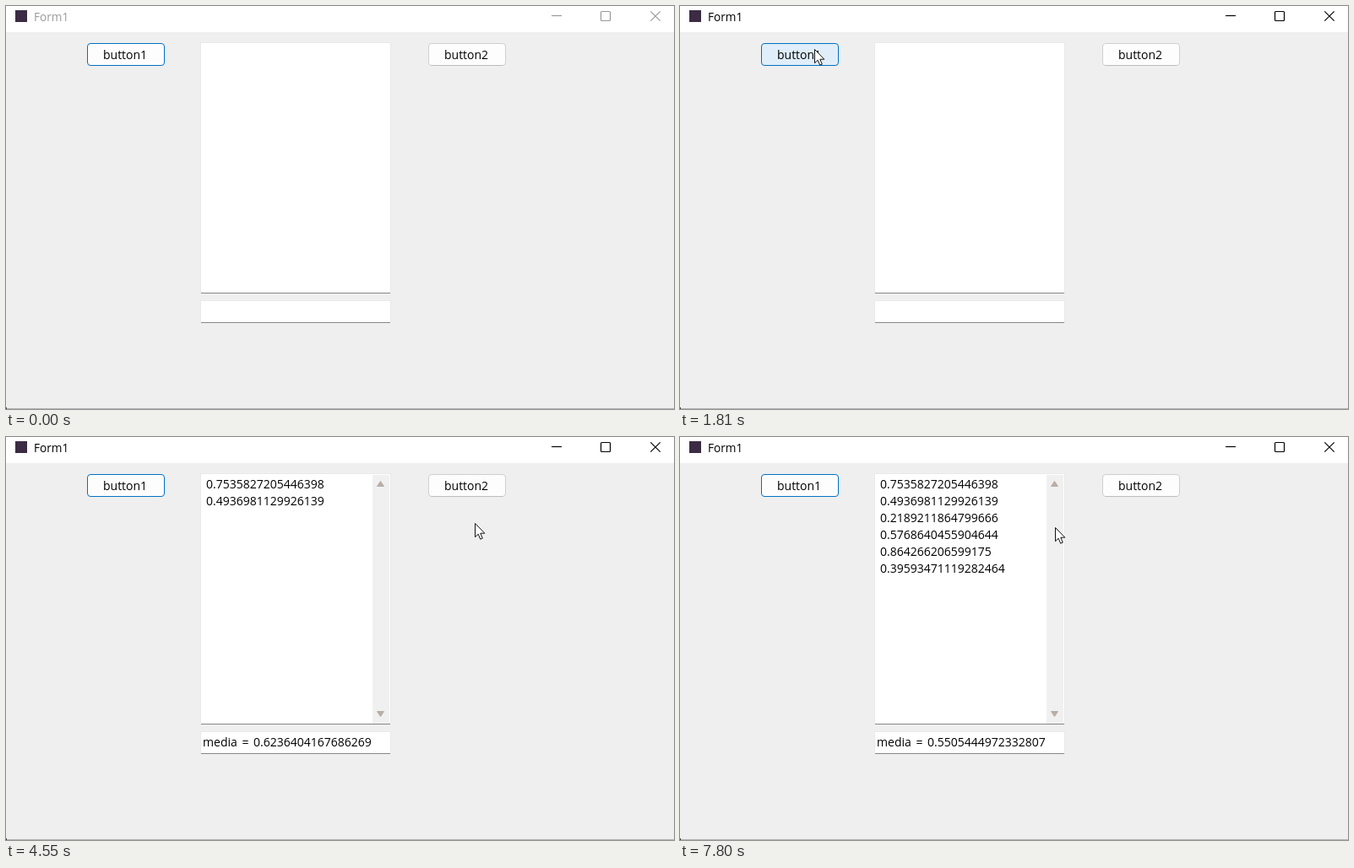
An HTML page for the animation above (8000 ms loop, 791 px wide and 478 px high).

```html
<!DOCTYPE html>
<html lang="en">
<head>
<meta charset="utf-8">
<title>Form1</title>
<style>
  html, body { margin: 0; width: 100%; height: 100%; overflow: hidden; background: #efefef; }
  svg { display: block; }
  text { font: 14px "Open Sans", "Noto Sans", sans-serif; fill: #000; white-space: pre; }
  #title { font-size: 13.6px; }
  #mean { word-spacing: 2px; }
</style>
</head>
<body>
<svg width="791" height="478" viewBox="0 0 791 478">
  <rect width="791" height="478" fill="#efefef"/>
  <rect width="791" height="31" fill="#fff"/>
  <path d="M0 477.5H791" stroke="#b4b4b4"/>
  <rect y="476" width="1" height="2" fill="#444"/>
  <rect x="11" y="5" width="14" height="14" fill="#3b2b43"/>
  <text id="title" x="33" y="17.5">Form1</text>
  <g id="controls" fill="none" stroke-width="1.2">
    <path d="M646 11.5H658"/>
    <rect x="704.5" y="6.5" width="11" height="11" rx="1"/>
    <path d="M763.3 6.3L774.7 17.7M774.7 6.3L763.3 17.7"/>
  </g>

  <rect id="button1" x="96.5" y="44.5" width="91" height="26" rx="3.5" stroke="#0070c4"/>
  <text x="115" y="63">button1</text>
  <rect x="500.5" y="44.5" width="91" height="26" rx="3.5" fill="#fdfdfd" stroke="#cfcfcf"/>
  <path d="M503.5 70.5H588.5" stroke="#bcbcbc"/>
  <text x="519" y="63">button2</text>

  <g fill="#fff" stroke="#e9e9e9">
    <rect x="230.5" y="43.5" width="225" height="297"/>
    <rect x="230.5" y="349.5" width="225" height="26"/>
  </g>
  <path d="M231 340.5H455M231 375.5H455" stroke="#868686"/>

  <g id="results">
    <rect x="434" y="45" width="20" height="295" fill="#f0f0f0"/>
    <path d="M443.5 52.5L447.5 58.5H439.5ZM443.5 331.5L447.5 325.5H439.5Z"
      fill="#b9aea5" stroke="#b9aea5" stroke-linejoin="round"/>
    <g id="list"></g>
    <text id="mean" x="233" y="367"></text>
  </g>

  <path id="cursor" d="M.5 .5V16.7L4.2 13.2L6.7 19.2L9.3 18.1L6.8 12.2H11.8Z" fill="#fff" stroke="#111"/>
</svg>
<script>
const LOOP = 8000;
const TICK = 70;             // pointer refresh, ms
const PRESS = 1680, RELEASE = 1810;
const FIRST = 2808, PERIOD = 998;
const values = [
  0.7535827205446398, 0.4936981129926139, 0.2189211864799666,
  0.5768640455904644, 0.864266206599175, 0.39593471119282464
];

const linear = u => u;
const easeOut = u => 1 - (1 - u) ** 2;

// The pointer rests at the end of each move until the next one begins.
const moves = [
  { start: 520, end: 1290, from: [234, 462], to: [161, 49], ease: easeOut },
  { start: 1360, end: 1480, from: [160, 50], to: [159, 51], ease: linear },
  { start: 3070, end: 3280, from: [172, 53], to: [530, 84], ease: linear },
  { start: 3340, end: 3410, from: [588, 86], to: [602, 86], ease: linear },
  { start: 4220, end: 4300, from: [601, 84], to: [600, 83], ease: linear },
  { start: 4550, end: 5240, from: [555, 102], to: [444, 107], ease: easeOut }
];

function pointerAt(t) {
  const move = moves.filter(m => m.start <= t).pop();
  if (!move) return null;
  const { start, end, from, to, ease } = move;
  const elapsed = t >= end ? end - start : Math.floor((t - start) / TICK) * TICK;
  const k = ease(elapsed / (end - start));
  return from.map((v, axis) => Math.round(v + (to[axis] - v) * k));
}

const $ = id => document.getElementById(id);
const show = (el, on) => el.style.display = on ? "" : "none";

const lines = values.map((value, i) => {
  const line = document.createElementNS("http://www.w3.org/2000/svg", "text");
  line.setAttribute("x", 237);
  line.setAttribute("y", 61 + 20 * i);
  line.textContent = value;
  return $("list").appendChild(line);
});

function drawPointer(t) {
  const spot = pointerAt(t);
  show($("cursor"), spot);
  if (spot) $("cursor").setAttribute("transform", `translate(${spot})`);
  const hover = spot && spot[0] >= 96 && spot[0] < 188 && spot[1] >= 44 && spot[1] < 71;
  const pressed = t >= PRESS && t < RELEASE;
  $("button1").setAttribute("fill", pressed ? "#cce4f7" : hover ? "#e0eef9" : "#fdfdfd");
}

function drawResults(t) {
  const count = Math.max(0, Math.min(values.length, Math.floor((t - FIRST) / PERIOD) + 1));
  show($("results"), count);
  lines.forEach((line, i) => show(line, i < count));
  const sum = values.slice(0, count).reduce((a, b) => a + b, 0);
  $("mean").textContent = count ? `media = ${sum / count}` : "";
}

function draw(t) {
  const active = t >= PRESS;
  $("title").style.fill = active ? "#000" : "#999";
  $("controls").setAttribute("stroke", active ? "#000" : "#999");
  drawPointer(t);
  drawResults(t);
}

const begin = performance.now();
function tick() {
  draw((performance.now() - begin) % LOOP);
  requestAnimationFrame(tick);
}
tick();
</script>
</body>
</html>
```
